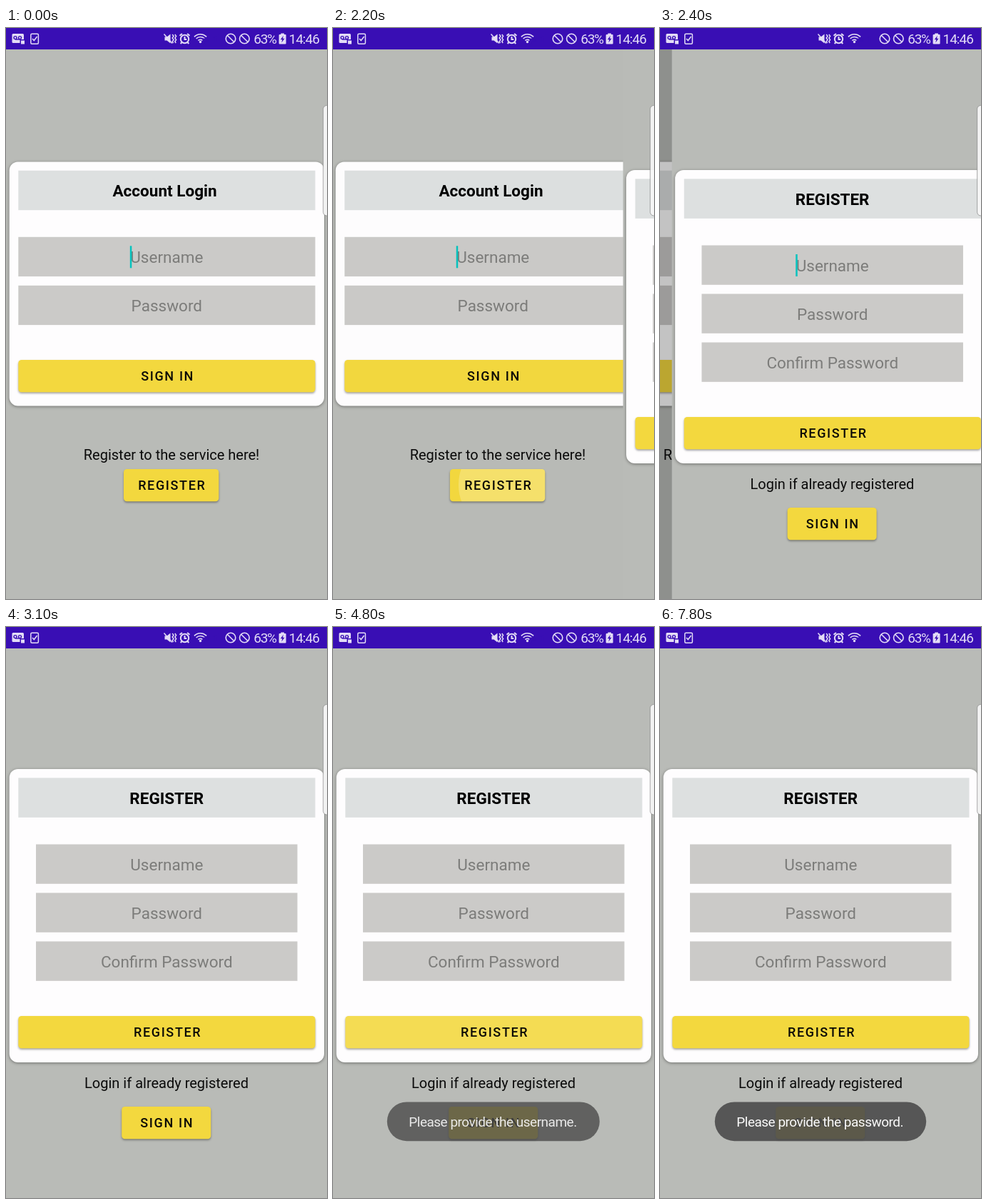
Animation of 450x800 px, one loop 8000 ms. Source, as an HTML page with a canvas:

```html
<!DOCTYPE html>
<html lang="en">
<head>
<meta charset="utf-8">
<title>Account login</title>
<style>
html, body { margin: 0; width: 100%; height: 100%; overflow: hidden; background: #b9bbb7; }
canvas { display: block; width: 450px; height: 800px; }
</style>
</head>
<body>
<canvas id="stage" width="450" height="800"></canvas>
<script>
const ctx = document.getElementById('stage').getContext('2d');
const W = 450, H = 800, LOOP = 8000, STEP = 100;
const FONT = 'Roboto, "Noto Sans", sans-serif';
const YELLOW = '#f3d83e', ICON = '#e3dcf6', BAR = '#390eb4';
const BLINKS = [300, 800, 1300, 1800, 2700, 3300, 3700, 4200, 4800, 5300, 5800, 6300, 6800, 7300, 7800];

const clamp = v => Math.max(0, Math.min(1, v));
const span = (t, from, to) => clamp((t - from) / (to - from));
const easeOut = x => 1 - (1 - x) * (1 - x);

// cubic-bezier(.33, 0, .2, 1)
function slideEase(x) {
  if (x <= 0 || x >= 1) return clamp(x);
  let lo = 0, hi = 1, u = 0.5;
  for (let i = 0; i < 24; i++) {
    u = (lo + hi) / 2;
    const bx = 3 * u * (1 - u) * ((1 - u) * 0.33 + u * 0.2) + u * u * u;
    if (bx < x) lo = u; else hi = u;
  }
  return u * u * (3 - 2 * u);
}

function rect(x, y, w, h, color) {
  ctx.fillStyle = color;
  ctx.fillRect(x, y, w, h);
}

function round(x, y, w, h, r) {
  ctx.beginPath();
  ctx.roundRect(x, y, w, h, r);
}

function shadow(alpha, blur, dy) {
  ctx.shadowColor = `rgba(0,0,0,${alpha})`;
  ctx.shadowBlur = blur;
  ctx.shadowOffsetY = dy;
}

function text(str, x, y, size, { color = '#0b0b0b', weight = 400, spacing = 0, align = 'center' } = {}) {
  ctx.font = `${weight} ${size}px ${FONT}`;
  ctx.letterSpacing = spacing + 'px';
  ctx.textAlign = align;
  ctx.fillStyle = color;
  ctx.fillText(str, x, y);
}

function card(y, h) {
  ctx.save();
  shadow(0.4, 4, 1);
  ctx.fillStyle = '#fefdfe';
  round(4.7, y, 441.3, h, 12);
  ctx.fill();
  ctx.restore();
}

function header(str, x, y) {
  rect(17.3, y, 416.2, 55.5, '#dde0e0');
  text(str, x, y + 36.7, 22.5, { weight: 700, color: '#000' });
}

function field(hint, x, y, w) {
  rect(x, y, w, 55.3, '#cbcac8');
  text(hint, 225.3, y + 36.6, 22.5, { color: '#7c7c7a' });
}

function cursor(y) {
  rect(173.8, y, 2.5, 31, '#05c3be');
}

function button(label, x, y, w, cx, { lift = 0, ripple } = {}) {
  ctx.save();
  shadow(0.36, 3 + 5 * lift, 1.8 + 4.5 * lift);
  ctx.fillStyle = YELLOW;
  round(x, y, w, 45.3, 4.5);
  ctx.fill();
  ctx.restore();
  if (ripple && ripple.a > 0) {
    ctx.save();
    round(x, y, w, 45.3, 4.5);
    ctx.clip();
    ctx.fillStyle = `rgba(255,255,255,${ripple.a})`;
    ctx.beginPath();
    ctx.arc(ripple.x, y + 22, ripple.r, 0, 7);
    ctx.fill();
    ctx.restore();
  }
  text(label, cx + 0.8, y + 29.2, 18, { weight: 500, spacing: 1.65, color: '#0c0b06' });
}

function loginPage(t, caret) {
  rect(0, 0, W, H, '#b9bbb7');
  card(187.5, 342);
  header('Account Login', 222.5, 199.7);
  field('Username', 17.3, 292.8, 416.2);
  field('Password', 17.3, 360.8, 416.2);
  if (caret) cursor(305.3);
  button('SIGN IN', 17.3, 465, 416.2, 225.8);
  text('Register to the service here!', 232, 605, 20);
  const ripple = t >= 2000 && { x: 245, r: 12 + (t - 2000) * 0.28, a: 0.23 };
  button('REGISTER', 165, 618, 133.3, 232, { ripple });
}

function registerPage(t, caret) {
  rect(0, 0, W, H, '#b9bbb7');
  card(199, 411);
  header('REGISTER', 225.2, 211.4);
  ['Username', 'Password', 'Confirm Password'].forEach((hint, i) => field(hint, 42, 304.5 + i * 68, 366.5));
  if (caret) cursor(317);
  const lift = t >= 4200 && t < 4700 ? (t < 4300 ? 0.5 : 1 - span(t, 4400, 4700)) : 0;
  const ripple = { x: 225, r: 220 * span(t, 4300, 4600), a: 0.22 * (1 - span(t, 4600, 5000)) };
  button('REGISTER', 17.3, 545, 416.2, 225.8, { lift, ripple });
  text('Login if already registered', 225, 646, 20);
  button('SIGN IN', 162.2, 672, 125, 225);
}

function toast(t) {
  const show = easeOut(span(t, 4400, 5000));
  if (!show) return;
  const swap = easeOut(span(t, 6300, 6900));
  ctx.save();
  ctx.globalAlpha = 0.9 * show;
  ctx.fillStyle = '#4c4c4c';
  round(75.8 + swap, 665.4, 298 - 1.6 * swap, 54.8, 27.4);
  ctx.fill();
  const line = (str, x, a) => {
    ctx.globalAlpha = show * a;
    if (a) text(str, x, 700, 19, { color: '#fafafa', spacing: -0.5, align: 'left' });
  };
  line('Please provide the username.', 106.3, 1 - swap);
  line('Please provide the password.', 107.3, swap);
  ctx.restore();
}

function path(points, close) {
  ctx.beginPath();
  points.forEach(([x, y]) => ctx.lineTo(x, y));
  if (close) ctx.closePath();
}

function ring(x, y, r) {
  ctx.beginPath();
  ctx.arc(x, y, r, 0, 7);
  ctx.stroke();
}

function statusBar(t) {
  rect(0, 0, W, 30, BAR);
  ctx.save();
  ctx.fillStyle = ctx.strokeStyle = ICON;

  // voicemail
  round(8.5, 8, 16.5, 13, 1.5);
  ctx.fill();
  ctx.strokeStyle = BAR;
  ctx.lineWidth = 1.4;
  ring(13, 13.6, 2);
  ring(19.5, 13.6, 2);
  path([[13, 16], [19.5, 16]]);
  ctx.stroke();
  rect(19.5, 16, 7, 7, BAR);
  rect(21, 17.5, 5, 5, ICON);

  // checked device
  ctx.strokeStyle = ICON;
  ctx.lineWidth = 1.5;
  round(34.8, 8.2, 10.6, 14, 1.5);
  ctx.stroke();
  path([[37, 15], [39.3, 17.5], [43.6, 12]]);
  ctx.stroke();

  // muted speaker with vibration
  path([[222.5, 12.5], [225.5, 12.5], [230.5, 8.5], [230.5, 21.5], [225.5, 17.5], [222.5, 17.5]], true);
  ctx.fill();
  path([[221.5, 8.5], [233, 21.5]]);
  ctx.stroke();
  for (const x of [233.2, 236.8]) {
    path([[x, 9], [x + 1.8, 11.5], [x, 14], [x + 1.8, 16.5], [x, 19], [x + 1.4, 21]]);
    ctx.stroke();
  }

  // alarm clock
  ctx.lineWidth = 2;
  ring(250.5, 15.5, 5.7);
  path([[250.5, 12], [250.5, 16], [253.3, 16]]);
  ctx.stroke();
  for (const s of [-1, 1]) {
    path([[250.5 + s * 3.6, 8], [250.5 + s * 7, 10.8]]);
    ctx.stroke();
    path([[250.5 + s * 4, 20], [250.5 + s * 5.8, 22]]);
    ctx.stroke();
  }

  // wifi with traffic arrows
  ctx.lineWidth = 1.6;
  for (const r of [4.2, 8, 11.8]) {
    ctx.beginPath();
    ctx.arc(272.5, 20.5, r, -Math.PI * 0.76, -Math.PI * 0.24);
    ctx.stroke();
  }
  ctx.beginPath();
  ctx.arc(272.5, 19.5, 1.7, 0, 7);
  ctx.fill();
  rect(275.5, 14.5, 9, 8, BAR);
  const busy = t >= 5100 && t < 6100;
  ctx.globalAlpha = busy ? 0.9 : 0.5;
  path([[276, 18], [280, 18], [278, 21.2]], true);
  ctx.fill();
  ctx.globalAlpha = t < 3100 || busy ? 0.6 : 0.5;
  path([[280.5, 18.3], [284.5, 18.3], [282.5, 15]], true);
  ctx.fill();
  ctx.globalAlpha = 1;

  // sim slot
  path([[287, 8], [296, 8], [299, 11], [299, 22], [287, 22]], true);
  ctx.fill();
  text('1', 293, 19.6, 12, { weight: 700, color: BAR });

  // no signal
  for (const x of [315, 334.3]) {
    ring(x, 15, 6.8);
    path([[x - 4.8, 10.2], [x + 4.8, 19.8]]);
    ctx.stroke();
  }

  // battery
  rect(385.3, 7.5, 4.6, 2.5, ICON);
  round(382.6, 9, 10, 13.4, 1);
  ctx.fillStyle = ICON;
  ctx.fill();
  ctx.fillStyle = BAR;
  path([[388.8, 10.8], [384.8, 16.3], [387.3, 16.3], [386.3, 20.6], [390.5, 14.8], [388, 14.8]], true);
  ctx.fill();

  text('63%', 347.3, 22.3, 19, { color: ICON, spacing: -1.3, align: 'left' });
  text('14:46', 396.5, 22.3, 19, { color: ICON, spacing: -1, align: 'left' });
  ctx.restore();
}

function edgeHandle() {
  ctx.save();
  round(444.7, 108.5, 16, 154.5, 5);
  ctx.fillStyle = 'rgba(248,248,248,.93)';
  ctx.fill();
  ctx.strokeStyle = 'rgba(130,130,130,.7)';
  ctx.lineWidth = 1;
  ctx.stroke();
  ctx.restore();
}

function draw(t) {
  const caret = BLINKS.filter(b => b <= t).length % 2 === 0;
  const p = slideEase((t - 2151) / 328);
  if (p < 1) {
    ctx.save();
    ctx.translate(-112 * p * p, 0);
    loginPage(t, caret);
    ctx.restore();
    if (p > 0) rect(0, 0, W, H, `rgba(0,0,0,${0.25 * p * p})`);
  }
  if (p > 0) {
    ctx.save();
    ctx.translate(W * (1 - p), 0);
    ctx.beginPath();
    ctx.rect(0, 0, W, H);
    ctx.clip();
    registerPage(t, caret);
    ctx.restore();
  }
  toast(t);
  statusBar(t);
  edgeHandle();
}

const start = performance.now();
function tick() {
  const t = (performance.now() - start) % LOOP;
  draw(Math.floor(t / STEP) * STEP);
  requestAnimationFrame(tick);
}
tick();
</script>
</body>
</html>
```
